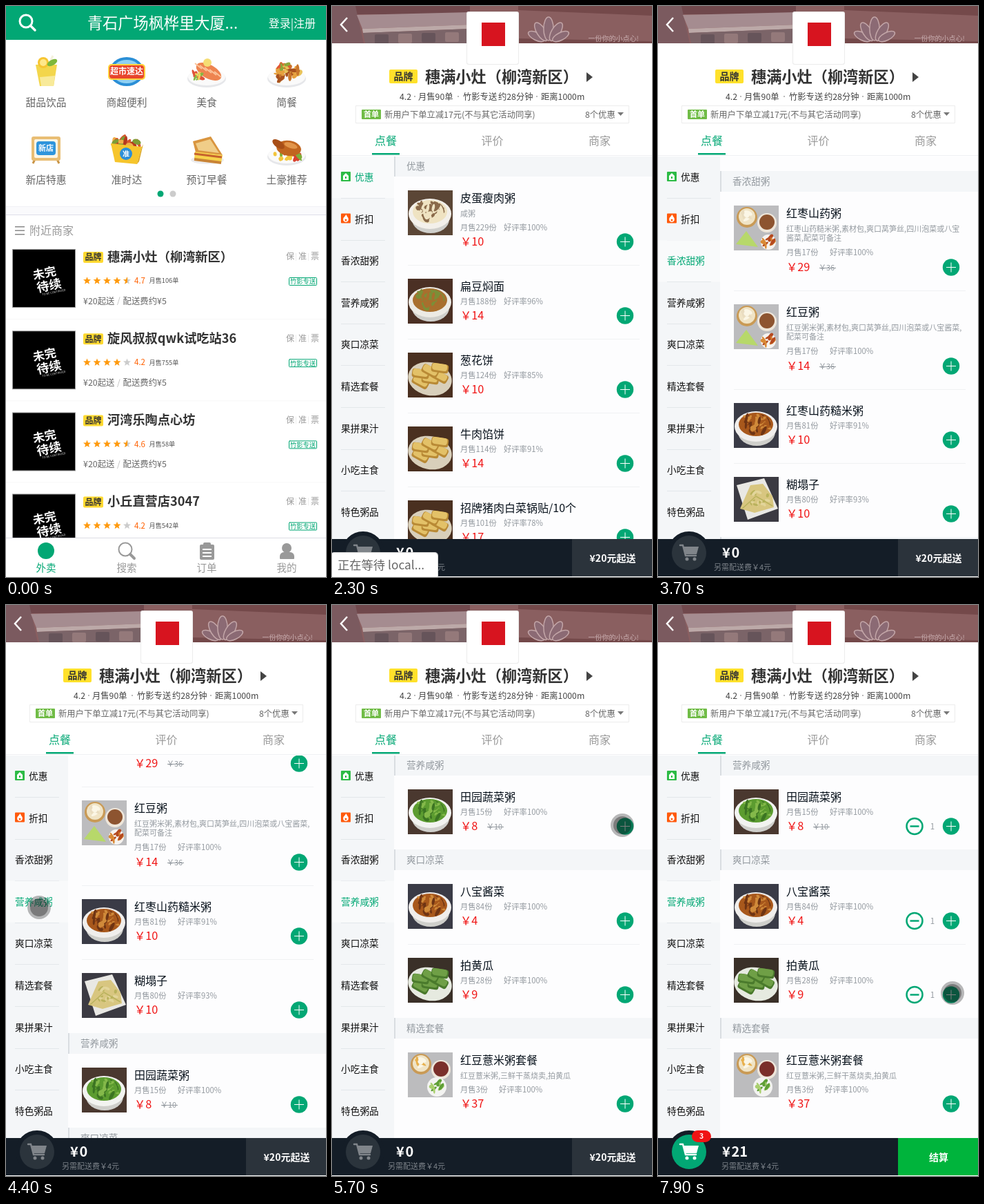
Recreate the animation shown at these times as an HTML page with a canvas. Size 464x827 px, loop 8 s.

```html
<!DOCTYPE html>
<html lang="zh-CN">
<head>
<meta charset="utf-8">
<title>外卖点餐</title>
<style>
html,body{margin:0;width:100%;height:100%;overflow:hidden;background:#fff}
canvas{display:block;width:464px;height:827px}
</style>
</head>
<body>
<canvas id="stage"></canvas>
<script>
const W = 464, H = 827, LOOP = 8000;
const FONT = '"Noto Sans CJK SC","Noto Sans CJK","Noto Sans",sans-serif';
const GREEN = '#02a774', GRAY = '#93999f', RED = '#f01414';
const cv = document.getElementById('stage'), g = cv.getContext('2d');
const dpr = window.devicePixelRatio || 1;
cv.width = W * dpr;
cv.height = H * dpr;

// ---- helpers ----
function text(s, x, y, size, color, weight = 400, align = 'left') {
  g.font = `${weight} ${size}px ${FONT}`;
  g.textAlign = align;
  g.fillStyle = color;
  g.fillText(s, x, y + size * 0.37);
}
function rect(x, y, w, h, color, r = 0) {
  g.fillStyle = color;
  g.beginPath();
  g.roundRect(x, y, w, h, r);
  g.fill();
}
function frame(x, y, w, h, color, r = 0) {
  g.strokeStyle = color;
  g.lineWidth = 1;
  g.beginPath();
  g.roundRect(x + 0.5, y + 0.5, w - 1, h - 1, r);
  g.stroke();
}
function oval(x, y, rx, ry, color, rot = 0) {
  g.fillStyle = color;
  g.beginPath();
  g.ellipse(x, y, rx, ry, rot, 0, 7);
  g.fill();
}
const disc = (x, y, r, color) => oval(x, y, r, r, color);
function ring(x, y, r, color, w) {
  g.strokeStyle = color;
  g.lineWidth = w;
  g.beginPath();
  g.arc(x, y, r, 0, 7);
  g.stroke();
}
function path(pts, close) {
  g.beginPath();
  for (let i = 0; i < pts.length; i += 2) g.lineTo(pts[i], pts[i + 1]);
  if (close) g.closePath();
}
function poly(pts, color) {
  path(pts, true);
  g.fillStyle = color;
  g.fill();
}
function line(pts, color, w, cap = 'butt') {
  path(pts);
  g.strokeStyle = color;
  g.lineWidth = w;
  g.lineCap = cap;
  g.stroke();
}
function at(x, y, draw, rot = 0) {
  g.save();
  g.translate(x, y);
  g.rotate(rot);
  draw();
  g.restore();
}
function clip(x, y, w, h, draw) {
  g.save();
  g.beginPath();
  g.rect(x, y, w, h);
  g.clip();
  draw();
  g.restore();
}
function random(seed) {
  return () => (seed = (seed * 16807) % 2147483647) / 2147483647;
}
function blobs(n, seed, x, y, rx, ry, size, colors) {
  const rnd = random(seed * 7919 + 13);
  for (let i = 0; i < n; i++) {
    const a = rnd() * 6.28, d = Math.sqrt(rnd());
    oval(x + Math.cos(a) * d * rx, y + Math.sin(a) * d * ry,
      size * (0.6 + rnd()), size * (0.3 + rnd() * 0.4), colors[i % colors.length], rnd() * 3);
  }
}
const lerp = (a, b, k) => a + (b - a) * k;
const unit = k => Math.max(0, Math.min(1, k));

// ---- home page ----
const COLS = [58, 175, 291, 407];
function plate() {
  oval(0, 10, 28, 13, '#e6e7ea');
  oval(0, 8, 27, 12, '#fafafa');
}
const ICONS = [
  ['甜品饮品', () => {
    poly([-15, -10, 16, -10, 11, 21, -9, 21], '#f3d64c');
    poly([-9, 8, 13, 6, 11, 21, -7, 21], '#f8ea9a');
    line([4, -10, 10, -23], '#f4f1dc', 3);
    disc(-4, -13, 8, '#f7c531');
    disc(-4, -13, 5, '#ffe88a');
    oval(9, -13, 8, 4, '#7eb83c', -0.5);
  }],
  ['商超便利', () => {
    oval(0, 0, 25, 21, '#2b8fd6');
    oval(0, 0, 21, 17, '#8fd0f2');
    rect(-27, -11, 54, 23, '#ffd23c', 5);
    rect(-25, -9, 50, 19, '#e8452c', 4);
    text('超市速达', 0, 0, 12, '#fff', 700, 'center');
  }],
  ['美食', () => {
    plate();
    oval(3, 0, 20, 10, '#ee8450', 0.5);
    for (let i = -2; i < 3; i++) line([i * 7 - 3, i * 3 - 6, i * 7 + 7, i * 3 + 2], '#fbc39a', 2);
    blobs(9, 3, -14, 6, 9, 5, 4, ['#86b644', '#e0533a', '#f2d45c']);
    disc(1, -13, 6, '#f5dd74');
  }],
  ['简餐', () => {
    plate();
    blobs(26, 5, 0, 1, 18, 10, 6, ['#c9762c', '#e6a13f', '#a9521f', '#e9c35a']);
    blobs(6, 8, -2, -8, 9, 5, 4, ['#e05a34', '#8aa83c']);
  }],
  ['新店特惠', () => {
    line([-16, 14, -19, 20], '#c99547', 3);
    line([16, 14, 19, 20], '#c99547', 3);
    rect(-21, -19, 42, 35, '#e9be74', 3);
    rect(-17, -15, 34, 27, '#fdf6e6', 2);
    rect(-14, -12, 28, 20, '#2f95dc', 4);
    text('新店', 0, -2, 11, '#fff', 700, 'center');
  }],
  ['准时达', () => {
    blobs(24, 11, 0, -9, 18, 7, 6, ['#d9532b', '#b5391f', '#7d9c35', '#efb04a']);
    poly([-23, -9, 22, -4, 15, 21, -17, 18], '#f6c52c');
    poly([22, -4, 24, -8, 18, 17, 15, 21], '#d8a21c');
    disc(-1, 6, 9, '#2c8fd8');
    text('准', -1, 6, 10, '#fff', 700, 'center');
  }],
  ['预订早餐', () => {
    oval(1, 15, 24, 6, '#ececee');
    poly([-20, -12, 6, -19, 23, 8, -16, 4], '#d9953f');
    poly([-16, -9, 5, -15, 18, 5, -12, 1], '#f0cd88');
    poly([-17, 3, 23, 8, 21, 19, -18, 14], '#f7d34c');
    line([-18, 6, 22, 11], '#c7632e', 3);
    line([-18, 14, 21, 19], '#c98436', 4);
  }],
  ['土豪推荐', () => {
    plate();
    blobs(18, 17, 0, 9, 22, 6, 5, ['#d8412f', '#7fae3a', '#f2c53c']);
    oval(3, -2, 18, 11, '#c1651f', 0.15);
    oval(-12, -8, 10, 5, '#a84e17', 0.6);
    oval(6, -6, 10, 4, '#e2954a', 0.3);
  }]
];
const SHOPS = [
  ['穗满小灶（柳湾新区）', '4.7', 106],
  ['旋风叔叔qwk试吃站36', '4.2', 755],
  ['河湾乐陶点心坊', '4.6', 58],
  ['小丘直营店3047', '4.2', 542]
];
function star(x, y, color) {
  const pts = [];
  for (let i = 0; i < 10; i++) {
    const r = i % 2 ? 2.5 : 5.8, a = i * Math.PI / 5 - Math.PI / 2;
    pts.push(x + Math.cos(a) * r, y + Math.sin(a) * r);
  }
  poly(pts, color);
}
function shopRow([name, score, sold], i) {
  const y = 352 + i * 118.2;
  rect(9, y, 92, 85, '#999');
  rect(10, y + 1, 90, 83, '#000');
  at(60, y + 46, () => {
    text('未完', -2, -12, 17, '#fff', 700, 'center');
    text('待续', 1, 7, 18, '#fff', 700, 'center');
    text('TO BE CONTINUED', 6, 18, 4, '#ddd', 400, 'center');
  }, -0.2);
  rect(112, y + 4, 29, 16, '#ffd930', 2);
  text('品牌', 126.5, y + 12, 12, '#333', 700, 'center');
  text(name, 147, y + 11, 18.2, '#333', 700);
  ['保', '准', '票'].forEach((c, k) => {
    text(c, 406 + k * 18, y + 11, 12, '#999');
    if (k) rect(402 + k * 18, y + 6, 1, 11, '#eee');
  });
  const whole = Math.floor(score), half = score - whole > 0.45;
  for (let k = 0; k < 5; k++) {
    const x = 117.5 + k * 14.5;
    star(x, y + 46, k < whole ? '#ff9a0d' : '#ccc');
    if (k === whole && half) clip(x - 6, y + 38, 6.5, 16, () => star(x, y + 46, '#ff9a0d'));
  }
  text(score, 186, y + 46, 11.5, '#ff6000', 500);
  text(`月售${sold}单`, 207.5, y + 46, 9.2, '#555');
  frame(410, y + 41, 41, 12, GREEN, 1);
  text('竹影专送', 430.5, y + 47, 9.3, GREEN, 400, 'center');
  text('¥20起送', 112, y + 75, 12.4, '#666');
  text('/', 161, y + 75, 12, '#bbb');
  text('配送费约¥5', 169.5, y + 75, 12.4, '#666');
  rect(0, y + 101, W, 1, '#f8f8f8');
}
function footer() {
  rect(0, 770, W, 57, '#fff');
  rect(0, 770, W, 1, '#dcdce4');
  const c = '#999';
  ['外卖', '搜索', '订单', '我的'].forEach((s, i) =>
    text(s, COLS[i], 814, 14.6, i ? c : GREEN, 400, 'center'));
  disc(58, 789, 12, GREEN);
  ring(173, 787, 9.5, c, 2);
  line([180, 794, 186, 800], c, 4, 'round');
  rect(281, 780, 21, 22, c, 2);
  rect(286, 777, 11, 6, c, 2);
  for (let i = 0; i < 3; i++) rect(285, 786 + i * 5, 13, 2, '#fff');
  disc(407, 785, 7, c);
  rect(397, 791, 21, 10, c, [6, 6, 1, 1]);
}
function home() {
  rect(0, 0, W, H, '#fff');
  rect(0, 0, W, 49, GREEN);
  ring(29, 22, 9, '#fff', 3);
  line([35.5, 28.5, 42, 35], '#fff', 3.5, 'round');
  text('青石广场枫桦里大厦...', 227, 25, 22.2, '#fff', 400, 'center');
  text('登录|注册', 449, 25, 16, '#fff', 500, 'right');
  ICONS.forEach(([label, draw], i) => {
    const x = COLS[i % 4], low = i > 3;
    at(x, low ? 208 : 95, draw);
    text(label, x, low ? 252 : 140, 14.8, '#666', 400, 'center');
  });
  disc(224, 272, 4.5, GREEN);
  disc(242, 272, 4.5, '#ccc');
  rect(0, 290, W, 13, '#fafafc');
  rect(0, 290, W, 1, '#f1f1f5');
  rect(0, 302, W, 1, '#dfdfea');
  for (let i = 0; i < 3; i++) rect(13, 319 + i * 5.5, 14, 1.5, '#888');
  text('附近商家', 34, 325, 16, '#999');
  SHOPS.forEach(shopRow);
  footer();
}
function statusBar() {
  rect(-2, 791, 156, 40, '#d4d4d4', 5);
  rect(-2, 792, 155, 40, '#fff', 5);
  text('正在等待 local...', 8, 810, 17.3, '#666');
}

// ---- menu data ----
// look: serving style, background, dish, then food colours
const LOOK = {
  congee: ['bowl', '#5b4636', '#f3f0ea', '#efe3c2', '#8a6a4a'],
  noodle: ['bowl', '#4b3024', '#eceae4', '#a86f2e', '#7b8f38'],
  cake: ['slices', '#4a3020', '#d8cfba', '#e3c168', '#b98a35'],
  tofu: ['bowl', '#6a3a30', '#f6f6f0', '#dfe6bd', '#f4f3e2', '#bcd08a'],
  cabbage: ['bowl', '#4a2a20', '#d8e6d2', '#9ccc4e', '#cfe58e', '#6fa52e'],
  fish: ['slices', '#8fc7a4', '#f6f8f4', '#d9963a', '#edb85e'],
  pickle: ['bowl', '#3a3b46', '#f0eeec', '#a8581c', '#d08a3a', '#6e3414'],
  pancake: ['wedge', '#3b3a42', '#e9e8e4', '#d8c680', '#b9b25c'],
  greens: ['bowl', '#4a382f', '#f2f3f0', '#5c9c30', '#84b94a', '#3c7423'],
  cucumber: ['slices', '#3a3028', '#e6eae0', '#6f9f46', '#4a7a2c']
};
const dish = (name, sold, rate, price, look, old, ...desc) => ({name, sold, rate, price, look, old, desc});
const MENU = [
  ['优惠', [
    dish('皮蛋瘦肉粥', 229, 100, 10, 'congee', 0, '咸粥'),
    dish('扁豆焖面', 188, 96, 14, 'noodle'),
    dish('葱花饼', 124, 85, 10, 'cake'),
    dish('牛肉馅饼', 114, 91, 14, 'cake'),
    dish('招牌猪肉白菜锅贴/10个', 101, 78, 17, 'cake')]],
  ['折扣', [
    dish('娃娃菜炖豆腐', 43, 92, 12, 'tofu'),
    dish('手撕包菜', 29, 100, 16, 'cabbage'),
    dish('香酥黄金鱼/3条', 15, 100, 11, 'fish')]],
  ['香浓甜粥', [
    dish('红枣山药粥', 17, 100, 29, 'set', 36, '红枣山药糙米粥,素材包,爽口莴笋丝,四川泡菜或八宝', '酱菜,配菜可备注'),
    dish('红豆粥', 17, 100, 14, 'set', 36, '红豆粥米粥,素材包,爽口莴笋丝,四川泡菜或八宝酱菜,', '配菜可备注'),
    dish('红枣山药糙米粥', 81, 91, 10, 'pickle'),
    dish('糊塌子', 80, 93, 10, 'pancake')]],
  ['营养咸粥', [dish('田园蔬菜粥', 15, 100, 8, 'greens', 10)]],
  ['爽口凉菜', [
    dish('八宝酱菜', 84, 100, 4, 'pickle'),
    dish('拍黄瓜', 28, 100, 9, 'cucumber')]],
  ['精选套餐', [dish('红豆薏米粥套餐', 3, 100, 37, 'combo', 0, '红豆薏米粥,三鲜干蒸烧卖,拍黄瓜')]],
  ['果拼果汁', []], ['小吃主食', []], ['特色粥品', []]
];
const GROW = [0, 21, 36];
const tops = [];
MENU.reduce((y, [, items]) => {
  tops.push(y);
  return items.reduce((s, d) => s + 107 + GROW[d.desc.length], y + 30);
}, 0);

// ---- timeline ----
// section taps: start time, section
const JUMPS = [[3022.4, 1], [3573, 2], [4384, 3]];
const ADDS = {'田园蔬菜粥': 5900, '八宝酱菜': 6800, '拍黄瓜': 7700};
// touches: from, to, x, y, pressed from
const TOUCHES = [
  [200, 300, 385, 108, 9e3], [800, 1000, 76, 403, 9e3], [1600, 2000, 220.5, 378, 1700],
  [2800, 3000, 40, 308, 2900], [4400, 5100, 48, 438, 4400], [5300, 6300, 421, 319, 5700],
  [6500, 7100, 431, 450, 6600], [7400, 8000, 427, 562, 7700]
];
function scrollAt(t) {
  let y = 0, active = 0;
  for (const [start, i] of JUMPS) {
    if (t < start) break;
    y = lerp(y, tops[i], 1 - (1 - unit((t - start) / 300)) ** 5);
    active = i;
  }
  return {y: Math.round(y), active};
}

// ---- shop page ----
const SERVE = {
  bowl(dishColor, food) {
    oval(33, 42, 27, 20, '#cfcfcb');
    oval(32, 34, 31, 22, dishColor);
    oval(32, 31, 25, 17, food[0]);
    blobs(46, 9, 32, 30, 20, 13, 5, food);
  },
  slices(dishColor, food) {
    oval(32, 38, 32, 24, dishColor, 0.2);
    for (let i = 0; i < 6; i++)
      at(18 + i % 3 * 14, 42 - i * 4, () => {
        rect(-12, -6, 25, 13, food[1], 4);
        rect(-11, -6, 22, 10, food[0], 4);
      }, 0.5 - i % 2 * 0.35);
  },
  wedge(dishColor, food) {
    poly([4, 12, 44, 2, 64, 46, 20, 62], dishColor);
    poly([9, 46, 24, 12, 42, 10, 56, 28, 58, 44, 30, 52], food[0]);
    blobs(16, 7, 36, 32, 16, 13, 3, [food[1], '#e2d59a']);
    line([32, 28, 12, 46], food[1], 1.5);
    line([32, 28, 56, 42], food[1], 1.5);
  }
};
function tray(combo) {
  rect(0, 0, 65, 65, '#bcbcbe');
  disc(19, 17, 15, '#c99a55');
  disc(19, 16, 12, '#f0e4c6');
  blobs(5, 4, 19, 16, 7, 6, 6, ['#fbf6e6', combo ? '#e8b04c' : '#e9dcc0']);
  disc(48, 25, 14, '#eee6da');
  disc(48, 24, 11, combo ? '#7a2f2a' : '#8d5430');
  if (combo) disc(42, 50, 14, '#f3f3f1');
  else {
    poly([3, 56, 18, 37, 35, 60], '#b7d86a');
    disc(50, 53, 11, '#f6f3f0');
  }
  blobs(10, 6, combo ? 42 : 50, combo ? 49 : 52, 8, 7, 4,
    combo ? ['#5f9f36', '#a9cf6e'] : ['#b5491f', '#d98a35']);
}
function photo(x, y, look) {
  clip(x, y, 65, 65, () => at(x, y, () => {
    if (!LOOK[look]) return tray(look === 'combo');
    const [style, back, dishColor, ...food] = LOOK[look];
    rect(0, 0, 65, 65, back);
    SERVE[style](dishColor, food);
  }));
}
function counter(name, y, t) {
  disc(425, y, 12.2, GREEN);
  rect(418, y - 0.5, 14, 1, '#fff');
  rect(424.5, y - 7, 1, 14, '#fff');
  if (!(t >= ADDS[name])) return;
  const k = unit((t - ADDS[name] + 60) / 300), e = 1 - (1 - k) ** 3;
  g.globalAlpha = e;
  at(lerp(387, 372, e), y, () => {
    ring(0, 0, 11.5, GREEN, 2.5);
    rect(-6.5, -1.25, 13, 2.5, GREEN);
  }, (1 - e) * Math.PI);
  g.globalAlpha = 1;
  text('1', 398, y, 11.5, GRAY, 400, 'center');
}
function dishRow(d, y, t) {
  const ty = y + 31, n = d.desc.length;
  const my = ty + [22, 43, 57][n], py = ty + [42, 63, 78][n];
  if (t >= 2200) photo(110, ty - 11, d.look);
  text(d.name, 186, ty, 16, '#07111b');
  d.desc.forEach((s, i) => text(s, 186, ty + 22.5 + i * 13.5, 11, GRAY));
  text(`月售${d.sold}份`, 186, my, 11.3, GRAY);
  text(`好评率${d.rate}%`, d.sold < 10 ? 242 : 249, my, 11.3, GRAY);
  text('￥' + d.price, 186, py, 16.3, RED);
  if (d.old) {
    const x = d.price > 9 ? 233 : 224;
    text('￥' + d.old, x, py + 1, 11, GRAY);
    rect(x + 1, py + 1, 24, 1, GRAY);
  }
  counter(d.name, py + 0.5, t);
}
function menuList(t, scroll) {
  rect(90, 217, W - 90, 555, '#fdfdfe');
  MENU.forEach(([title, items], i) => {
    let y = 217 + tops[i] - scroll;
    if (!items.length) return;
    rect(90, y, W - 90, 30, '#f4f6f8');
    rect(90, y, 2, 30, '#d9dde1');
    text(title, 108, y + 15, 13.6, GRAY);
    y += 30;
    items.forEach((d, k) => {
      const h = 107 + GROW[d.desc.length];
      if (y < 780 && y + h > 210) dishRow(d, y, t);
      y += h;
      if (k < items.length - 1) rect(110, y, 336, 1, '#f0f1f3');
    });
  });
}
function sidebar(active) {
  rect(0, 217, 90, 555, '#f4f6f8');
  MENU.forEach(([title], i) => {
    const y = 248 + i * 60.6;
    if (i === active) rect(0, y - 30, 90, 60, '#f9fafb');
    if (i < 8) rect(13, Math.round(y + 30), 64, 1, '#e3e7ea');
    if (i < 2) {
      rect(13, y - 8, 14, 14, i ? '#ff5a0c' : '#2dbb46', 1);
      if (i) {
        disc(20, y + 0.5, 3.8, '#fff');
        poly([16.5, y - 1, 20.5, y - 6.5, 23.5, y - 1], '#fff');
        disc(20, y + 1.5, 1.5, '#ff5a0c');
      } else {
        poly([16, y - 2, 20, y - 6, 24, y - 2, 24, y + 4, 16, y + 4], '#fff');
        rect(19, y - 1, 2, 3, '#2dbb46');
      }
    }
    text(title, i < 2 ? 33 : 13, y, 13.7, i === active ? GREEN : '#111');
  });
}
function leaf(x, y, size, rot) {
  at(x, y, () => {
    g.beginPath();
    g.ellipse(0, -size, size * 0.42, size, 0, 0, 7);
    g.fillStyle = '#8b6a74';
    g.fill();
    g.strokeStyle = '#c3a6a8';
    g.lineWidth = 1.5;
    g.stroke();
  }, rot);
}
function storefront() {
  clip(0, 0, W, 54, () => {
    rect(0, 0, W, 54, '#8a5f60');
    rect(0, 0, 200, 12, '#70484c');
    poly([0, 0, 34, 0, 46, 54, 0, 54], '#7b5a5f');
    poly([36, 13, 200, 9, 200, 27, 44, 33], '#a58c90');
    poly([44, 33, 200, 27, 200, 33, 45, 39], '#bca9a8');
    poly([45, 39, 200, 33, 200, 54, 48, 54], '#7b6468');
    for (let i = 0; i < 4; i++) rect(62 + i * 34, 41 - i, 20, 14, i % 2 ? '#94797a' : '#66545a', 2);
    poly([270, 0, W, 0, W, 14, 270, 6], '#74494a');
    poly([270, 47, W, 51, W, 54, 270, 54], '#74494a');
    for (let i = -2; i < 3; i++) leaf(314 + i * 3, 50, 17 - Math.abs(i) * 2, i * 0.55);
    text('一份你的小点心!', 408, 47, 10, '#c9aeb0', 400, 'center');
  });
}
function shopHead() {
  rect(0, 0, W, 217, '#fff');
  storefront();
  line([22, 17, 13, 27, 22, 37], '#fff', 2.5);
  rect(195, 8, 76, 77, '#ececec', 3);
  rect(196, 9, 74, 75, '#fff', 3);
  rect(217, 24, 34, 34, '#d7141f');
  rect(83, 92, 41, 20, '#ffe12b', 2);
  text('品牌', 103.5, 102, 14, '#333', 700, 'center');
  text('穗满小灶（柳湾新区）', 135, 103, 22.2, '#333', 700);
  poly([369, 96, 378, 103, 369, 110], '#444');
  [['4.2', 98], ['月售90单', 125], ['竹影专送', 190], ['约28分钟', 241], ['距离1000m', 303]]
    .forEach(([s, x]) => text(s, x, 131, 12.3, '#444'));
  [120, 183, 297].forEach(x => disc(x, 131, 0.9, '#999'));
  frame(34, 144, 397, 26, '#ececec');
  rect(43, 150, 28, 14, '#70bc46', 1);
  text('首单', 57, 157, 11, '#fff', 700, 'center');
  text('新用户下单立减17元(不与其它活动同享)', 76, 157, 12.3, '#666');
  text('8个优惠', 367, 157, 12.3, '#666');
  poly([414, 154, 423, 154, 418.5, 159], '#777');
  text('点餐', 78, 195, 16, GREEN, 500, 'center');
  text('评价', 232.5, 195, 16, '#999', 400, 'center');
  text('商家', 388, 195, 16, '#999', 400, 'center');
  rect(0, 216, W, 1, '#eff0f3');
  rect(58, 213, 40, 2.5, GREEN);
}
function cartBar(t) {
  const added = MENU.flatMap(m => m[1]).filter(d => t >= ADDS[d.name]);
  const n = added.length, total = added.reduce((s, d) => s + d.price, 0);
  rect(0, 772, W, 54, '#141d27');
  disc(45, 792, 31, '#141d27');
  disc(45, 792, 25, n ? GREEN : '#2b343c');
  const c = n ? '#fff' : '#80858a';
  line([32, 781, 36, 781, 40, 796, 55, 796], c, 2.4, 'round');
  poly([37, 783, 59, 783, 56, 794, 40, 794], c);
  disc(42, 801, 2.5, c);
  disc(53, 801, 2.5, c);
  if (n) {
    rect(49, 761, 28, 17, RED, 8.5);
    text(n, 63, 769.5, 10.5, '#fff', 700, 'center');
  }
  text('¥', 93, 792, 20, '#fff', 700);
  text(total, 106.5, 792, 20, '#fff', 700);
  text('另需配送费￥4元', n ? 92 : 81, 813, 11, '#7d838a');
  const ready = total >= 20;
  rect(348, 772, 116, 54, ready ? '#00b43c' : '#2b333b');
  const label = ready ? '结算' : n ? `还差¥${20 - total}元起送` : '¥20元起送';
  text(label, 407, 799.5, 14, '#fff', 700, 'center');
}
function shop(t) {
  const {y, active} = scrollAt(t);
  rect(0, 0, W, H, '#fff');
  clip(0, 218, W, 554, () => {
    menuList(t, y);
    sidebar(active);
  });
  shopHead();
  cartBar(t);
}

// ---- touch pointer ----
function pointer(t) {
  for (const [from, to, x, y, press] of TOUCHES) {
    if (t < from || t >= to) continue;
    const px = from === 5300 ? lerp(391, x, unit((t - from) / 300)) : x;
    const k = t >= press ? 1 : 0.45;
    disc(px, y, 17, `rgba(20,20,20,${0.3 * k})`);
    disc(px, y, 13, `rgba(20,20,20,${0.36 * k})`);
  }
}

function draw(now) {
  const t = Math.floor((now % LOOP) / 100) * 100;
  g.setTransform(dpr, 0, 0, dpr, 0, 0);
  if (t < 2000) home();
  else shop(t);
  if (t >= 1900 && t < 2400) statusBar();
  pointer(t);
}
const begin = performance.now();
function tick() {
  draw(performance.now() - begin);
  requestAnimationFrame(tick);
}
tick();
</script>
</body>
</html>
```
